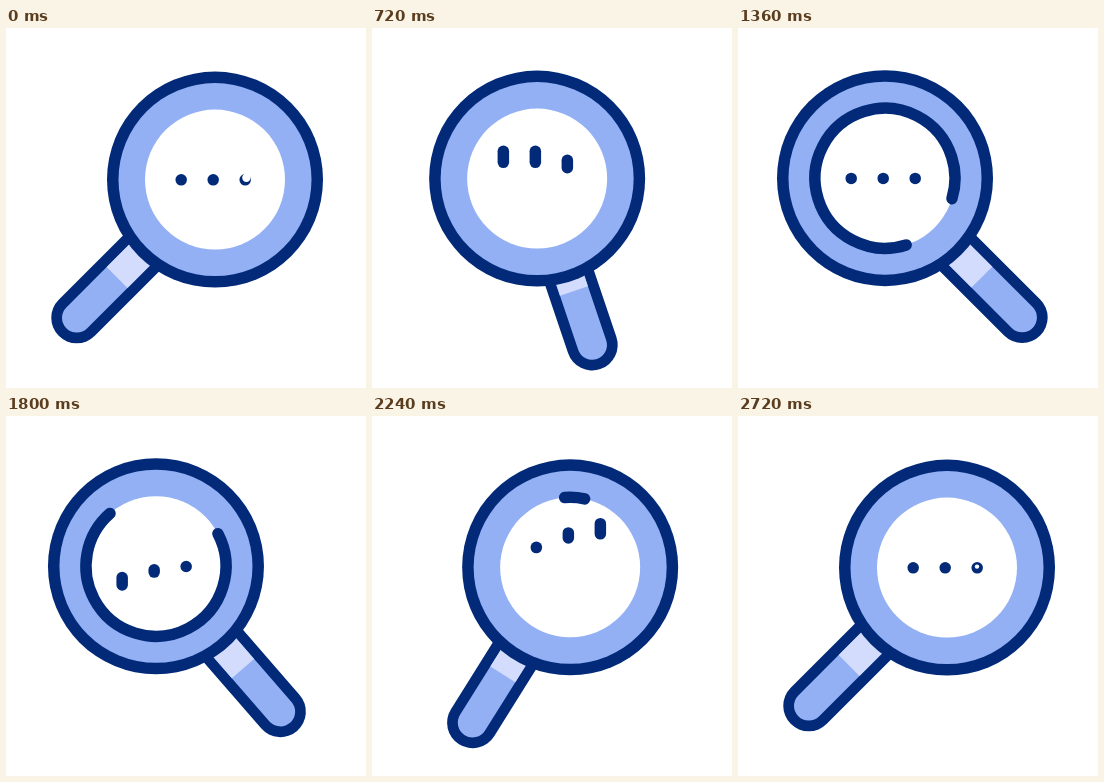
An HTML page with a canvas that plays this animation: 360x360 px, repeating every 3000 ms.

```html
<!DOCTYPE html>
<html lang="en">
<head>
<meta charset="utf-8">
<title>Searching</title>
<style>
  html, body { margin: 0; width: 100%; height: 100%; overflow: hidden; background: #fff; }
  canvas { display: block; width: 360px; height: 360px; }
</style>
</head>
<body>
<canvas width="360" height="360"></canvas>
<script>
const ctx = document.querySelector('canvas').getContext('2d');
const NAVY = '#022a79', BLUE = '#93b0f4', PALE = '#d3dcfd', WHITE = '#fff';
const LOOP = 3000, STEP = 40, STROKE = 11.5;

const radians = degrees => degrees * Math.PI / 180;
const progress = (t, from, to) => Math.min(1, Math.max(0, (t - from) / (to - from)));
const easeInOut = u => u < .5 ? 4 * u ** 3 : 1 - 4 * (1 - u) ** 3;
const easeOut = u => 1 - (1 - u) ** 3.5;
const easeIn = u => u ** 1.2;
// Rises from 0 to 1 and falls back to 0.
const bump = (t, from, to) => Math.sin(Math.PI * progress(t, from, to)) ** 2;
// Swings out to 1, rests there and swings back to 0.
const swing = (t, backFrom, backTo) =>
  easeInOut(progress(t, 268, 1045)) - easeInOut(progress(t, backFrom, backTo));

function line(x, y0, y1, width, color, cap = 'round') {
  ctx.lineCap = cap;
  ctx.lineWidth = width;
  ctx.strokeStyle = color;
  ctx.beginPath();
  ctx.moveTo(x, y0);
  ctx.lineTo(x, y1);
  ctx.stroke();
}

function disc(x, y, r, color) {
  ctx.fillStyle = color;
  ctx.beginPath();
  ctx.arc(x, y, r, 0, Math.PI * 2);
  ctx.fill();
}

// The handle is shortest when it points straight down.
function drawHandle(turn) {
  const bend = 1 - 2 * turn;
  const end = 171 + 24.5 * bend * bend;
  ctx.save();
  ctx.rotate(radians(45 * bend));
  ctx.translate(-1.5 * turn, 0);
  line(0, 60, end, 51, NAVY);
  line(0, 60, end, 29.5, BLUE);
  line(0, 60, end - 57, 29.5, PALE, 'butt');
  ctx.restore();
}

// Both ends travel two turns; the head leaves early and the tail catches up.
function drawArc(t) {
  const tail = -75 + 720 * easeIn(progress(t, 1030, 2268));
  const head = -75 + 720 * easeOut(progress(t, 962, 2580));
  if (head <= tail) return;
  ctx.lineCap = 'round';
  ctx.lineWidth = STROKE;
  ctx.strokeStyle = NAVY;
  ctx.beginPath();
  ctx.arc(0, 0, 70, radians(tail), radians(head));
  ctx.stroke();
}

function drawDot(x, t) {
  const hop = 23 * bump(t, 345, 1005) + 21 * bump(t, 1810, 2260);
  const dip = 16.5 * bump(t, 1640, 2040);
  const lift = 22 * bump(t, 1780, 2540);
  const y = dip - hop - lift + .2;
  const half = (hop + dip) / 4 + .01;
  line(x, y - half, y + half, STROKE, NAVY);
}

function draw() {
  const t = Math.floor(performance.now() % LOOP / STEP) * STEP;
  const slide = swing(t, 1560, 2610);
  ctx.fillStyle = WHITE;
  ctx.fillRect(0, 0, 360, 360);
  ctx.save();
  ctx.translate(209 - 62 * slide, 151.6 - 1.4 * slide);
  drawHandle(swing(t, 1580, 2565));
  disc(0, 0, 108, NAVY);
  disc(0, 0, 108 - STROKE, BLUE);
  disc(0, 0, 70, WHITE);
  drawArc(t);
  for (let i = 0; i < 3; i++) drawDot(-33.8 + 32 * i, t - 90 * i);
  // Shine on the last dot while it rests.
  if (t < 540) disc(31.4, -1.8, 4.2, WHITE);
  if (t >= 2720) disc(30, -1, 2.2, WHITE);
  ctx.restore();
  requestAnimationFrame(draw);
}
draw();
</script>
</body>
</html>
```
